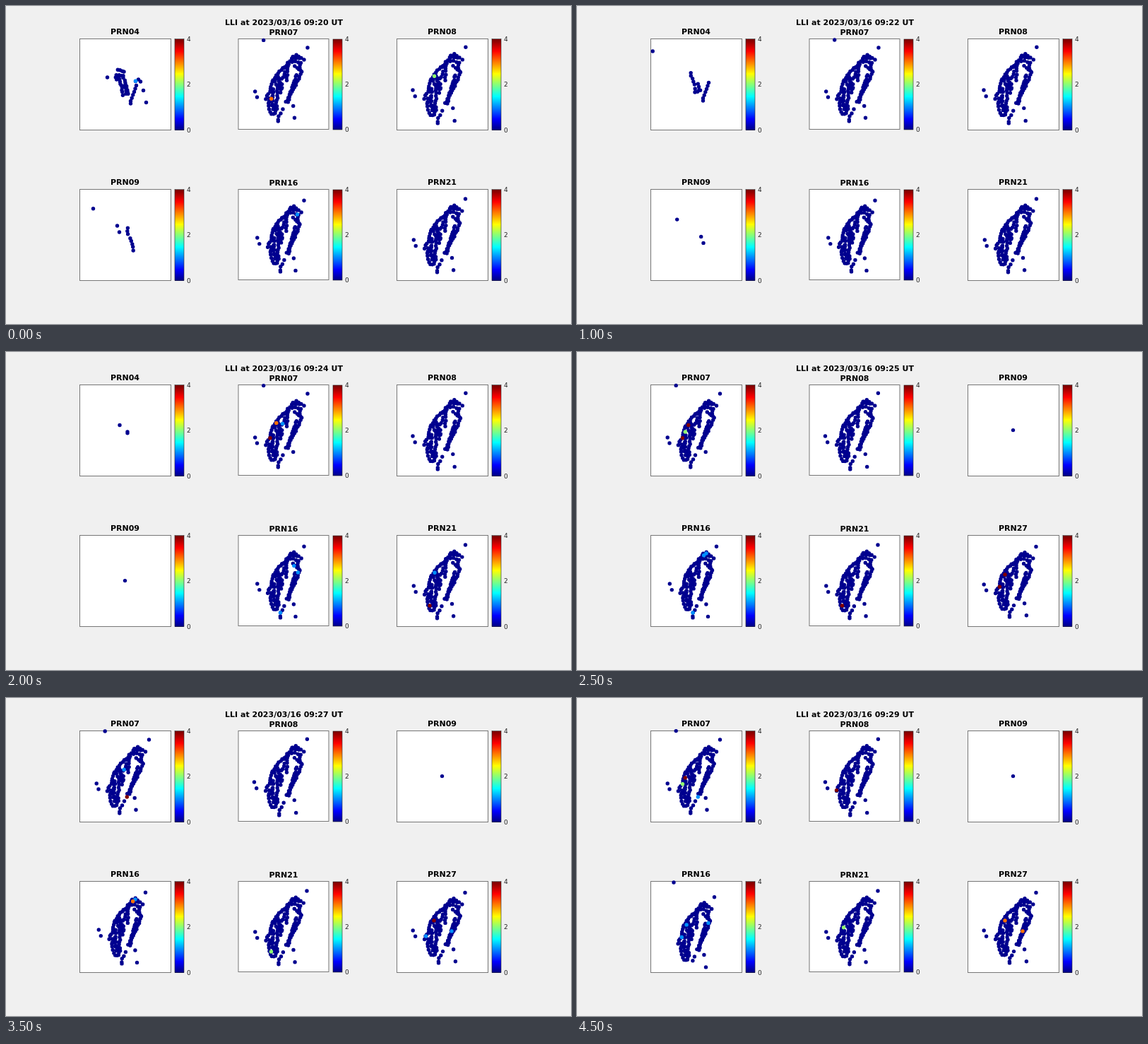
Write an HTML page that moves like this. It is 800 px wide and 450 px high and loops after 5 s.

```html
<!DOCTYPE html>
<html lang="en">
<head>
<meta charset="utf-8">
<title>LLI maps</title>
<style>
  html, body { margin: 0; width: 100%; height: 100%; overflow: hidden; background: #f0f0f0; }
  svg { display: block; width: 800px; height: 450px; }
  text { font-family: "DejaVu Sans", sans-serif; }
  .title { font-size: 11px; font-weight: bold; text-anchor: middle; }
  .tick { font-size: 9px; fill: #262626; }
  .dots { fill: none; stroke-width: 5.4; stroke-linecap: round; }
</style>
</head>
<body>
<svg id="stage" viewBox="0 0 800 450"></svg>
<script>
const STEP = 500, COUNT = 10;
const stage = document.getElementById('stage');

function add(tag, attrs, text) {
  const node = document.createElementNS('http://www.w3.org/2000/svg', tag);
  for (const key in attrs) node.setAttribute(key, attrs[key]);
  if (text !== undefined) node.textContent = text;
  return stage.appendChild(node);
}

// 64-step jet colour map, i = 0..63
function jet(i) {
  const ramp = shift => Math.max(0, Math.min(1, 1.5 - Math.abs(i + 1 - shift) / 16));
  return `rgb(${[48, 32, 16].map(s => Math.round(255 * ramp(s))).join()})`;
}
const LEVELS = [0, 16, 32, 48, 63].map(jet);

const PANELS = [46.5, 259.5].flatMap(y => [104.5, 329, 553.5].map((x, col) => ({ x, y, mid: col === 1 })));

const noise = n => { const v = Math.sin(n * 12.9898) * 43758.5453; return v - Math.floor(v) - 0.5; };
const moved = (dots, dx, dy) => dots.map(([x, y]) => [x + dx, y + dy]);

// Dots strewn along polylines
function trace(lines, gap = 3.5, spread = 2) {
  let seed = 0;
  return lines.flatMap(line => line.flatMap(([x, y], i) => {
    const [nx, ny] = line[i + 1] || [x, y];
    const n = Math.max(1, Math.round(Math.hypot(nx - x, ny - y) / gap));
    return Array.from({ length: n }, (_, k) => {
      seed++;
      return [x + (nx - x) * k / n + spread * noise(seed), y + (ny - y) * k / n + spread * noise(seed + 500)];
    });
  }));
}

const COAST = [
  [[404, 74], [411, 69.5], [418, 74], [406, 72]],
  [[404, 75], [397, 83], [387, 93], [377, 107], [374, 121], [368, 131]],
  [[372, 131], [372, 142], [375, 153], [381, 152], [382, 140]],
  [[410, 79], [417, 80], [416, 88], [419, 93], [407, 118], [397, 136]],
  [[412, 97], [403, 122], [400, 136]]
];
const INLAND = [
  [[404, 79], [399, 86], [398, 104]],
  [[394, 88], [393, 101], [377, 105]],
  [[409, 86], [418, 93]],
  [[385, 99], [390, 122]],
  [[388, 104], [391, 118]],
  [[381, 103], [384, 120], [383, 145]],
  [[379, 118], [378, 146]],
  [[376, 123], [377, 140]]
];
const MAINLAND = [...trace(COAST, 3.4, 1.6), ...trace(INLAND, 3.8, 2.6)];
const EAST_ISLES = [[427, 59], [422, 76], [406.7, 141.5], [392, 146], [389, 152]];
const WEST_ISLES = [[352.7, 121], [355.5, 129]];
const SOUTH_TIP = [[386, 156], [385.3, 161], [385.3, 163]];

const SITES = {
  summit: [410.8, 70.8], north: [407, 74], harbor: [415.7, 79.8], cape: [410.2, 88],
  cliff: [415.8, 96.3], hill: [382.8, 100.5], pass: [391.6, 101.4], ridge: [382.3, 103.5],
  bay: [377.7, 113], reef: [405.6, 115.8], port: [374, 121.8], flats: [370, 127],
  spit: [367.8, 130.9], dune: [375.7, 131.3], cove: [395.8, 140], shoal: [375, 146.4],
  tip: [385.6, 156.2], islet: [408.5, 158.2]
};

// Raised readings for each minute, by satellite and site
const RAISED = [
  { '07': { dune: 3 }, '08': { hill: 2 }, '16': { harbor: 1 } },
  { '07': { islet: 1 }, '21': { pass: 1 } },
  {},
  { '07': { hill: 4, cape: 3, bay: 2, port: 1 }, '08': { hill: 1 },
    '16': { cape: 1, port: 1, dune: 1 }, '21': { shoal: 1 } },
  { '07': { hill: 3, pass: 1, port: 4 }, '16': { cape: 1, cliff: 1, tip: 1 }, '21': { hill: 1, shoal: 4 } },
  { '07': { ridge: 4, bay: 2, port: 4 }, '16': { north: 1, summit: 1, tip: 1 },
    '21': { shoal: 4 }, '27': { ridge: 4, port: 4 } },
  { '16': { north: 1 }, '21': { shoal: 4 }, '27': { ridge: 4 } },
  { '07': { pass: 1, cove: 4 }, '16': { summit: 1, north: 3 }, '21': { shoal: 2 },
    '27': { ridge: 4, flats: 1, reef: 1 } },
  { '27': { ridge: 4, reef: 1 } },
  { '07': { bay: 4, port: 2, cove: 1 }, '08': { spit: 4 }, '16': { ridge: 1, cliff: 1, port: 1 },
    '21': { bay: 2 }, '27': { ridge: 3, reef: 3 } }
];

// North, west and south landmarks of each map, relative to its panel
const LANDMARKS = {
  '07': [[98, 12.5], [23.7, 74.5], [56.3, 115.8]],
  '08': [[97.4, 11.7], [22.5, 72.5], [57.8, 118.7]],
  '16': [[93, 15.8], [26.8, 68.5], [59.5, 115.7]],
  '21': [[97, 13.5], [23.8, 71.5], [57, 116.6]],
  '27': [[96.5, 16], [22.7, 69.5], [59, 114.7]]
};

// Affine map that carries the landmarks of 07 onto those of another satellite
function project(prn) {
  const [n, w, s] = LANDMARKS['07'], [tn, tw, ts] = LANDMARKS[prn];
  const ax = n[0] - s[0], ay = n[1] - s[1], bx = w[0] - s[0], by = w[1] - s[1];
  const det = ax * by - bx * ay;
  return ([px, py]) => {
    const dx = px - PANELS[1].x - s[0], dy = py - PANELS[1].y - s[1];
    const a = (dx * by - bx * dy) / det, b = (ax * dy - dx * ay) / det;
    return [0, 1].map(i => ts[i] + a * (tn[i] - ts[i]) + b * (tw[i] - ts[i]));
  };
}

function islandDots(prn, step) {
  const drifted = prn === '16' && step === 9;
  const dots = [...MAINLAND, ...EAST_ISLES];
  if (!drifted) dots.push(...WEST_ISLES, ...SOUTH_TIP);
  if (prn !== '07' || step < 4 || step > 5) dots.push(SITES.islet);
  if (prn === '07') dots.push([364.7, 48.4 - step * 0.2]);
  const raised = Object.entries(RAISED[step][prn] || {});
  const place = list => {
    const placed = list.map(project(prn));
    return drifted ? moved(placed, -3, 6.5) : placed;
  };
  const levels = LEVELS.map((_, level) =>
    place(level ? raised.filter(r => r[1] === level).map(r => SITES[r[0]]) : dots));
  if (drifted) levels[0].push([32.5, 1.5]);
  return levels;
}

// Sparse maps, relative to their panel
const CLUSTER = [
  [[51, 51], [52, 58]],
  [[54, 44], [63, 46]],
  [[53, 51], [61, 52], [63, 58], [68, 76]],
  [[54, 52], [60, 69], [61, 79], [68, 77]],
  [[64, 67], [67, 76]]
];
const CLUSTER_EAST = [[[80, 66], [77, 75], [72, 88]], [[72, 91.5]], [[90, 73]], [[94, 90]]];
const CLUSTER_FAR = [[[39, 54.5]], [[83, 57.5]], [[79, 60]], [[86, 60.5]]];

function clusterDots(step) {
  switch (step) {
    case 0: return [...trace(CLUSTER, 3.2, 1.6), ...trace(CLUSTER_EAST, 5.5, 0), ...CLUSTER_FAR.flat()];
    case 1: return [
      ...moved([...trace(CLUSTER.slice(2), 3.4, 1.6), ...trace(CLUSTER_EAST, 5.5, 0), CLUSTER_FAR[0][0]], 2.2, -2.7),
      [1, 20], [53.5, 47.5], [57.5, 47.5], [81.5, 63.5]];
    case 2: return [
      ...moved([...trace(CLUSTER.slice(3), 4.5, 1.6), ...trace(CLUSTER_EAST.slice(0, 2), 5.5, 0)], 2, -4),
      [2.7, 17.5]];
    case 3: return [
      ...trace([[[60.5, 56.5], [64.5, 64.5], [69.5, 76]]], 4.2, 1),
      [54.5, 53.5], [58.5, 64.5], [72, 66.5]];
    default: return [[56.5, 57], [67.5, 66.5], [67.5, 68.2]];
  }
}

function trailDots(step) {
  switch (step) {
    case 0: return [
      ...trace([[[67.5, 54.5], [68, 63.5]], [[71.5, 69.5], [75.5, 81]]], 4, 1),
      [19, 27.2], [53, 51.5], [56, 60.5], [75.7, 86.5]];
    case 1: return [[34.2, 40.5], [68, 64.8], [71.5, 73.8], [82, 77]];
    case 2: return [[37.2, 42.6], [71.2, 66.9], [74.5, 75.9]];
    case 3: return [[40.2, 44.8], [74.5, 69.1], [77.5, 78.1]];
    default: return [[64, 64.1]];
  }
}

function minutePaths(step) {
  const prns = step < 5 ? ['04', '07', '08', '09', '16', '21'] : ['07', '08', '09', '16', '21', '27'];
  const levels = LEVELS.map(() => []);
  prns.forEach((prn, i) => {
    const { x, y } = PANELS[i];
    const sparse = prn === '04' ? clusterDots : trailDots;
    const found = LANDMARKS[prn] ? islandDots(prn, step) : [sparse(step)];
    found.forEach((dots, level) => levels[level].push(...moved(dots, x, y)));
  });
  if (step === 0) levels[1].push([183.5, 106.3]);
  if (step === 1) levels[4].push([162, 94]);
  const paths = levels.map(dots => dots.map(([x, y]) => `M${x.toFixed(1)} ${y.toFixed(1)}h0`).join(''));
  return { prns, paths };
}

// Axes and colour bars
const titles = PANELS.map(({ x, y, mid }) => {
  const size = mid ? 128 : 129, barTop = y + (mid ? 0.5 : 0), barX = x + (mid ? 134 : 134.5);
  add('rect', { x, y, width: size, height: size, fill: '#fff', stroke: '#777' });
  for (let i = 0; i < 64; i++) {
    const from = Math.round(barTop + size * (63 - i) / 64);
    const to = Math.round(barTop + size * (64 - i) / 64);
    add('rect', { x: barX, y: from, width: 13, height: to - from, fill: jet(i), 'shape-rendering': 'crispEdges' });
  }
  add('rect', { x: barX, y: barTop, width: 13, height: size, fill: 'none', stroke: '#262626', 'stroke-width': 0.6 });
  [4, 2, 0].forEach((value, i) =>
    add('text', { class: 'tick', x: barX + 17, y: barTop + size * i / 2 + 3 }, value));
  return add('text', { class: 'title', x: x + 64, y: y - (mid ? 5.5 : 6.5) });
});
const heading = add('text', { class: 'title', x: 393.5, y: 27 });
const layers = LEVELS.map(stroke => add('path', { class: 'dots', stroke }));
const minutes = Array.from({ length: COUNT }, (_, step) => minutePaths(step));

let shown = -1;
const start = performance.now();
function tick() {
  const step = Math.floor((performance.now() - start) / STEP) % COUNT;
  if (step !== shown) {
    shown = step;
    const { prns, paths } = minutes[step];
    heading.textContent = `LLI at 2023/03/16 09:2${step} UT`;
    titles.forEach((title, i) => { title.textContent = 'PRN' + prns[i]; });
    layers.forEach((layer, i) => layer.setAttribute('d', paths[i]));
  }
  requestAnimationFrame(tick);
}
tick();
</script>
</body>
</html>
```
